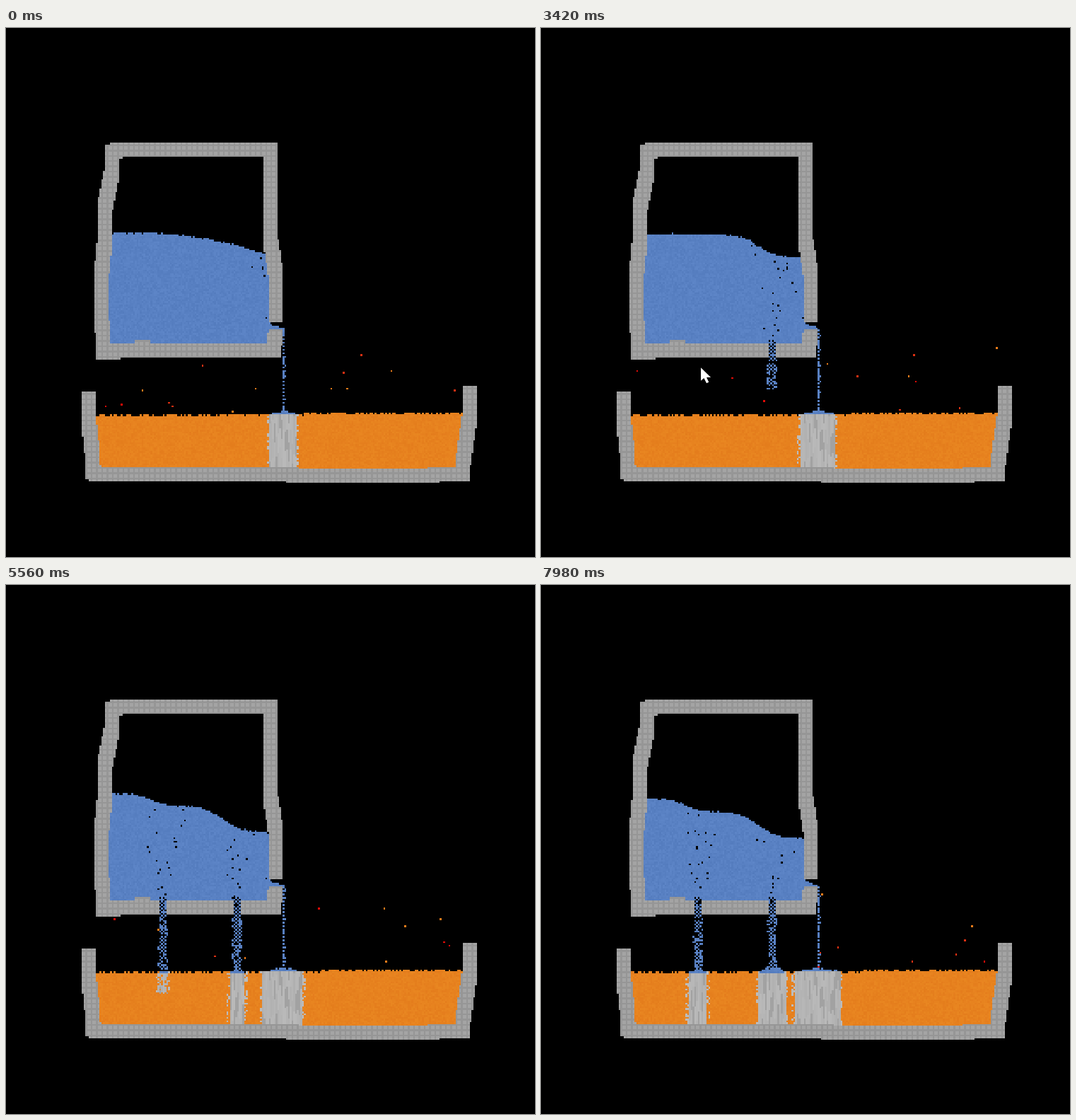
Animation of 748x748 px, one loop 8 s. Source, as an HTML page with a canvas:

```html
<!DOCTYPE html>
<html lang="en">
<head>
<meta charset="utf-8">
<title>Water over lava</title>
<style>
  html, body { margin: 0; width: 100%; height: 100%; overflow: hidden; background: #000; }
  canvas, svg { position: absolute; left: 0; top: 0; width: 100vw; height: 100vh; display: block; }
  canvas { image-rendering: pixelated; }
</style>
</head>
<body>
<canvas id="world" width="300" height="300"></canvas>
<svg id="overlay" viewBox="0 0 748 748">
  <g id="cursor">
    <circle id="halo" cx="-1" cy="0" r="15" fill="#ffff14" fill-opacity=".5"/>
    <path d="M0 0V18.5L4.3 14.6L8 22L11.2 20.4L8 13.6H14Z" fill="#fff"/>
  </g>
</svg>
<script>
const N = 300, CELL = 748 / N, LOOP = 8000, STEP = 46.5, BRUSH = 8;
const ctx = document.getElementById('world').getContext('2d');
const cursor = document.getElementById('cursor');
const halo = document.getElementById('halo');
const image = ctx.createImageData(N, N);
const pixels = new Uint32Array(image.data.buffer);

const rgb = (r, g, b) => (255 << 24 | b << 16 | g << 8 | r) >>> 0;
const BLACK = rgb(0, 0, 0), WALL = rgb(164, 164, 164), JOINT = rgb(150, 150, 150);
const FRINGE = rgb(188, 188, 188);
const EMBERS = [rgb(226, 10, 6), rgb(222, 48, 18), rgb(238, 124, 26)];

// Repeatable random number in 0..1
function hash(a, b = 0, c = 0) {
  let h = Math.imul(a + 101, 374761393) ^ Math.imul(b + 57, 668265263) ^ Math.imul(c + 13, 1274126177);
  h = Math.imul(h ^ h >>> 15, 2246822519);
  h = Math.imul(h ^ h >>> 13, 3266489917);
  return ((h ^ h >>> 16) >>> 0) / 4294967296;
}

const clamp = (v, lo, hi) => Math.min(hi, Math.max(lo, v));
const easeOut = (t, from, to) => 1 - (1 - clamp((t - from) / (to - from), 0, 1)) ** 2;
const sigmoid = v => 1 / (1 + Math.exp(-v));

function put(x, y, color) {
  if (x >= 0 && x < N && y >= 0 && y < N) pixels[y * N + x] = color;
}

// Walls are strokes of a square brush, given by its top left corner in cells
const strokes = [
  [[60, 65], [56, 66], [56, 78], [52, 98], [52, 116], [50, 136], [50, 164], [51, 167],
   [51, 180], [56, 180], [59, 179], [148, 179], [148, 173], [149, 171]],
  [[149, 159], [149, 136], [146, 116], [146, 65], [60, 65]],
  [[73, 177], [74, 177]],
  [[43, 206], [43, 220], [45, 238], [45, 248], [49, 249], [156, 249], [161, 250], [236, 250],
   [240, 249], [255, 249], [255, 244], [259, 216], [259, 203]]
];

const holes = [
  { x: 129, cut: 2330, open: 2550, grow: 1.4, rise: 1.3 },
  { x: 87, cut: 3620, open: 3770, grow: 1.1, rise: 1 }
];

// Pointer: time, x, y
const pointer = [
  [1900, 392, 486], [2250, 327, 458], [2560, 327, 458], [3420, 223, 481],
  [3600, 222, 457], [3800, 222, 457], [4700, 712, 440]
];

const waterColor = (x, y) => {
  const v = hash(x, y, 1) * 10 - 5;
  return rgb(89 + v, 129 + v, 195 + v);
};
const lavaColor = (x, y) => {
  const v = hash(x, y, 2) * 10 - 5;
  return rgb(231 + v * .5, 130 + v, 31 + v * .5);
};
const stoneColor = (x, y) => {
  const run = Math.floor(y / 11 + hash(x, 3) * 9);
  const v = hash(x, run, 4) < .25 ? 162 : 176 + hash(x, run, 5) * 10;
  return rgb(v, v, v);
};

function stamp(x0, y0) {
  for (let y = y0; y < y0 + BRUSH; y++)
    for (let x = x0; x < x0 + BRUSH; x++)
      put(x, y, x % 3 === 0 || y % 3 === 0 ? JOINT : WALL);
}

function drawStroke(points) {
  for (let i = 1; i < points.length; i++) {
    const [ax, ay] = points[i - 1], [bx, by] = points[i];
    const count = Math.max(Math.abs(bx - ax), Math.abs(by - ay));
    for (let k = 0; k <= count; k++)
      stamp(Math.round(ax + (bx - ax) * k / count), Math.round(ay + (by - ay) * k / count));
  }
}

function drawLava(t, n) {
  const edge = 169 + t / LOOP * 14;
  for (let x = 48; x <= 260; x++) {
    const top = (x < edge ? 219 : 218) + (hash(x, n, 6) < .45 ? 1 : 0);
    for (let y = top; y < 250; y++) put(x, y, lavaColor(x, y));
  }
}

function drawPillar(left, right, bottom, fill) {
  for (let y = 219; y < bottom; y++)
    for (let x = Math.floor(left) - 2; x <= right + 2; x++) {
      const out = Math.max(left - x, x + 1 - right);
      if (out <= .5) {
        if (hash(x, y, 7) < fill) put(x, y, stoneColor(x, y));
      } else if (out < 2 && hash(x, y, 8) < .3) put(x, y, FRINGE);
    }
}

function drawMound(mid, half, height, base, n) {
  for (let x = Math.floor(mid - half); x <= mid + half; x++) {
    const h = height * (1 - Math.abs(x + .5 - mid) / (half + 1)) + hash(x, n, 9) * .8;
    for (let y = Math.round(base - h); y < base; y++) put(x, y, waterColor(x, y));
  }
}

// Surface height in pixels: a bow toward the spout that turns into one dip per hole
function waterLevel(px, t) {
  const first = easeOut(t, 2500, 3700), second = easeOut(t, 3750, 6000);
  const drain = Math.min(t, 3000) * .0005 + Math.max(0, t - 4500) * .003;
  const bow = 30 * (Math.max(0, px - 190) / 177) ** 2;
  return 290.5 + drain + bow * (1 - first)
    + first * 33 * sigmoid((px - 306) / 12)
    + second * (15 * sigmoid((px - 204) / 8) + 8 * (px - 150) / 220);
}

function drawWater(t, n) {
  for (let x = 56; x < 150; x++) {
    const level = waterLevel(clamp((x + .5) * CELL, 150, 370), t) / CELL;
    for (let y = Math.floor(level + hash(x, n, 10) * .9 - .2); y < 179; y++)
      put(x, y, waterColor(x, y));
  }
  // Spout and its thin fall
  for (let x = 149; x < 157; x++)
    for (let y = Math.floor(168 + (x - 149) * .3 + hash(x, n, 11) * .7); y < 171; y++)
      put(x, y, waterColor(x, y));
  for (let y = 170; y < 218; y++) {
    const key = y - n;
    if (key % 2 === 0 || hash(key, 12) < .3) put(157, y, waterColor(157, y));
    if (y > 171 && hash(key, 13) < .16) put(158, y, waterColor(158, y));
  }
}

// Empty cells drifting up from an outlet
function drawBubbles(x0, y0, oneSided, count, age, n, seed) {
  for (let i = 0; i < count; i++) {
    const life = 16 + Math.floor(hash(i, seed) * 9);
    const clock = n + Math.floor(hash(i, seed, 1) * life), step = clock % life;
    if (step > age) continue;
    const id = Math.floor(clock / life) * 40 + i;
    const lean = hash(id, seed, 2) * 2 - 1;
    const dx = Math.round(lean * (3 + step * .6) + (hash(id, step, seed) - .5) * 2);
    const x = x0 + (oneSided ? -Math.abs(dx) : dx);
    const y = y0 - Math.round(step * 2.7 + hash(id, seed, 3) * 3);
    if (x > 59 && x < 149) put(x, y, BLACK);
  }
}

function drawHole(h, t, n) {
  if (t < h.cut) return;
  const through = t > h.open - 80;
  for (let y = through ? 179 : 181; y < 187; y++)
    for (let x = h.x; x < h.x + 4; x++) put(x, y, BLACK);
  if (!through) return;
  const head = Math.min(218, Math.floor(187 + (t - h.open) / STEP));
  for (let y = 177; y < head; y++) {
    const key = y - n;
    for (let x = h.x - 1; x < h.x + 5; x++) {
      const core = x >= h.x && x < h.x + 4;
      if (!core && y < 188) continue;
      const chance = !core ? .22 : (x + key) % 2 === 0 ? .92 : .15;
      if (hash(x, key, 15) < chance) put(x, y, waterColor(x, y));
      else if (core) put(x, y, BLACK);
    }
  }
}

function drawPool(h, t, n) {
  const age = (t - h.open) / 1000 - 1.45;
  if (age < 0) return;
  const mid = h.x + 2, half = 2.2 + age * h.grow;
  const bottom = Math.min(250, Math.floor(219 + age * 43));
  drawPillar(mid - half, mid + half, bottom, .5 + age * .5);
  drawMound(mid, half * .85, age * h.rise, 220, n);
}

function drawEmbers(n) {
  for (let i = 0; i < 14; i++) {
    const life = 24 + Math.floor(hash(i, 18) * 36);
    const clock = n + Math.floor(hash(i, 19) * life), step = clock % life;
    const id = Math.floor(clock / life) * 20 + i;
    const sway = (hash(id, 21) - .5) * .5 * step + Math.sin(step * .4 + id) * 2;
    const x = Math.round(clamp(53 + hash(id, 20) * 204 + sway, 52, 258));
    const y = 217 - step, underTank = x < 158;
    if (underTank && y < 185) continue;
    put(x, underTank ? Math.max(y, x < 64 ? 188 : 187) : y, EMBERS[Math.floor(hash(id, 22) * 3)]);
  }
}

function drawCursor(t) {
  const next = pointer.findIndex(p => t < p[0]);
  cursor.style.display = next > 0 ? '' : 'none';
  if (next < 1) return;
  const [t0, x0, y0] = pointer[next - 1], [t1, x1, y1] = pointer[next];
  const k = (t - t0) / (t1 - t0);
  cursor.setAttribute('transform', `translate(${x0 + (x1 - x0) * k} ${y0 + (y1 - y0) * k})`);
  const pressed = holes.some(h => t >= h.cut - 30 && t < h.open - 40);
  halo.style.display = pressed ? '' : 'none';
}

function render(time) {
  const n = Math.floor(time / STEP), t = n * STEP;
  pixels.fill(BLACK);
  drawLava(t, n);
  drawPillar(149.2 - t * .0007, 164.8 + t * .0006, 250, 1);
  drawMound(157.5, 6.5 + t * .0004, 1.6, 219, n);
  holes.forEach(h => drawPool(h, t, n));
  drawWater(t, n);
  drawBubbles(149, 167, true, 9, Infinity, n, 30);
  holes.forEach(h => drawBubbles(h.x + 2, 177, false, 24, (t - h.open + 80) / STEP, n, h.x));
  strokes.forEach(drawStroke);
  holes.forEach(h => drawHole(h, t, n));
  drawEmbers(n);
  ctx.putImageData(image, 0, 0);
  drawCursor(t);
}

const start = performance.now();
function tick() {
  render((performance.now() - start) % LOOP);
  requestAnimationFrame(tick);
}
tick();
</script>
</body>
</html>
```
